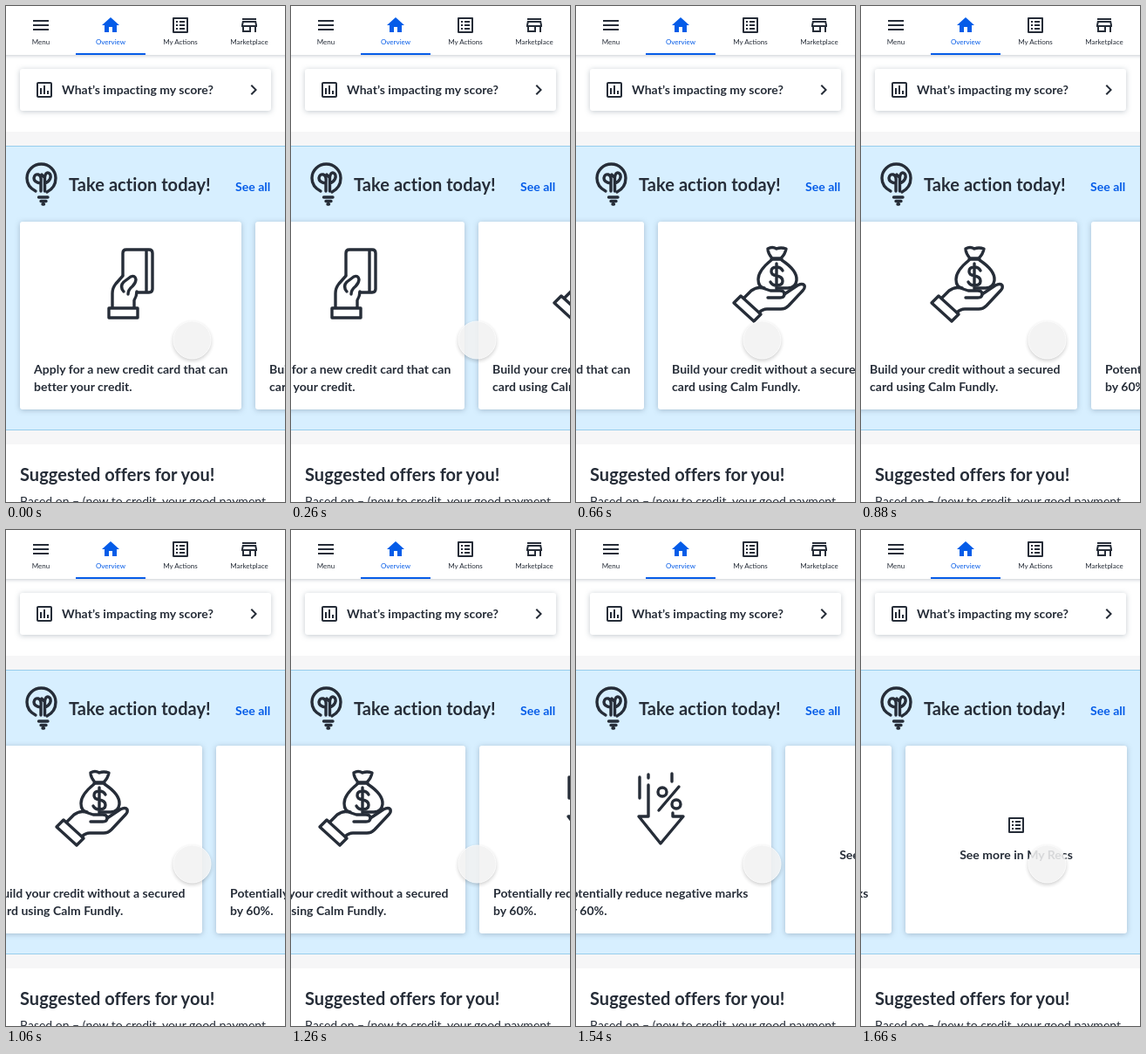
Recreate the animation shown at these times as an HTML page. Size 320 px wide and 568 px high, loop 3660 ms.

```html
<!DOCTYPE html>
<html lang="en">
<head>
<meta charset="utf-8">
<title>Credit overview</title>
<style>
  html, body { margin: 0; width: 100%; height: 100%; overflow: hidden; background: #fff; }
  svg { display: block; }
  text { font-family: Lato, sans-serif; fill: #262d38; }
  .h { font-size: 20px; font-weight: 700; letter-spacing: .05px; }
  .b { font-size: 14px; font-weight: 700; letter-spacing: .04px; }
  .p { font-size: 14px; }
  .nav { font-size: 8px; text-anchor: middle; }
  .mid { text-anchor: middle; }
  text.blue { fill: #055ce8; }
  .icon { fill: #262d38; }
  .icon.blue { fill: #055ce8; }
  .line { fill: none; stroke: #262d38; stroke-width: 3.4; stroke-linecap: round; stroke-linejoin: round; }
  .card { fill: #fff; filter: drop-shadow(0 1px 3px rgba(30, 50, 75, .27)); }
  .bar { fill: #fff; filter: drop-shadow(0 1px 2px rgba(30, 50, 75, .25)); }
  .touch { fill: #f2f2f2; stroke: #fafafa; filter: drop-shadow(0 2px 2px rgba(0, 0, 0, .22)); opacity: .87; }
</style>
</head>
<body>
<svg id="stage" width="320" height="568" viewBox="0 0 320 568"></svg>
<script>
const ICONS = {
  menu: 'M3 6h18v2H3zM3 11h18v2H3zM3 16h18v2H3z',
  home: 'M10 20v-6h4v6h5v-8h3L12 3 2 12h3v8z',
  list: 'M19 5v14H5V5h14m1.1-2H3.9c-.5 0-.9.4-.9.9v16.2c0 .4.4.9.9.9h16.2c.4 0 .9-.5.9-.9V3.9c0-.5-.5-.9-.9-.9z' +
    'M11 7h6v2h-6zM11 11h6v2h-6zM11 15h6v2h-6zM7 7h2v2H7zM7 11h2v2H7zM7 15h2v2H7z',
  store: 'M18.36 9l.6 3H5.04l.6-3h12.72M20 4H4v2h16V4zm0 3H4l-1 5v2h1v6h10v-6h4v6h2v-6h1v-2l-1-5zM6 18v-4h6v4H6z',
  chart: 'M19 3H5c-1.1 0-2 .9-2 2v14c0 1.1.9 2 2 2h14c1.1 0 2-.9 2-2V5c0-1.1-.9-2-2-2zm0 16H5V5h14v14z' +
    'M7 10h2v7H7zM11 7h2v10h-2zM15 13h2v4h-2z',
  chevron: 'M10 6L8.59 7.41 13.17 12l-4.58 4.59L10 18l6-6z'
};

const rect = (x, y, w, h, fill) => `<rect x="${x}" y="${y}" width="${w}" height="${h}" fill="${fill}"/>`;
const text = (x, y, cls, s) => `<text x="${x}" y="${y}" class="${cls}">${s}</text>`;
const icon = (name, x, y, cls = '') =>
  `<path class="icon ${cls}" fill-rule="evenodd" transform="translate(${x} ${y})" d="${ICONS[name]}"/>`;
const line = d => `<path class="line" d="${d}"/>`;
const ring = (x, y, r) => `<circle class="line" cx="${x}" cy="${y}" r="${r}"/>`;
const tab = (name, x, label, cls = '') => icon(name, x - 12, 10, cls) + text(x, 44, 'nav ' + cls, label);

// Card drawings use coordinates relative to the card's top left corner.
const handWithCard =
  line('M118 61V36q0-4 4-4h26q4 0 4 4v41q0 4-4 4h-14M145 32v49') +
  line('M102 99h33v11h-33z') +
  line('M106 98V82q0-6 4-11l8-9M131 98v-8q3-5 3-10') +
  line('M119 80q-5-6 0-11l8-6q5-2 6 3q0 4-4 8q-5 4-5 9');

const handWithBag =
  line('M131 42q-5-6-5-11q5-3 10 0q5-2 11 0q-1 6-6 11zM130 43h12') +
  line('M130 44q-15 12-15 22q0 9 7 10M142 44q18 12 17 23q-1 9-10 9h-12') +
  line('M143 56q-2-4-7-4q-6 0-6 5q0 4 6 5q7 1 7 6q0 5-7 5q-5 0-7-4M136 48v29') +
  line('M87 93l8-8l23 21l-8 8z') +
  line('M99 87l8-8q7-5 13-3l9 3h11q5 0 5 4t-5 4h-14') +
  line('M145 83l15-10q6-3 8 0q1 3-2 6l-16 17q-4 4-9 4h-16q-5 0-9 4');

const percentDown =
  line('M103 36v24M113 33v4M113 45v36h-11l25 31l26-31h-12v-4M140 32v9M148 47l-23 27') +
  ring(129, 53, 5) + ring(145, 67, 5);

const caption = (a, b) => text(16, 174, 'b', a) + text(16, 194, 'b', b);
const cards = [
  handWithCard + caption('Apply for a new credit card that can', 'better your credit.'),
  handWithBag + caption('Build your credit without a secured', 'card using Calm Fundly.'),
  percentDown + caption('Potentially reduce negative marks', 'by 60%.'),
  icon('list', 115, 79) + text(127, 130, 'b mid', 'See more in My Recs')
];

const bulb =
  line('M34 212q-10-5-10-15a16.5 16 0 0 1 33 0q0 11-10 16') +
  line('M40 212v-9q-8-1-8-6q1-5 5-4q4 1 3 10M44.5 212v-16q1-6 4-5q4 2 2 7q-2 4-6 5M41 193l3.5 4') +
  line('M37.5 219h10.5M40 223.5h6M42 227h1.5');

document.getElementById('stage').innerHTML =
  rect(0, 0, 320, 568, '#fff') +
  rect(0, 144, 320, 358, '#f6f6f7') +
  rect(0, 160, 320, 326, '#d7efff') +
  rect(0, 160, 320, 1, '#97cdec') + rect(0, 485, 320, 1, '#97cdec') +
  rect(0, 502, 320, 66, '#fff') +
  '<rect class="bar" x="-8" y="-8" width="336" height="64"/>' +
  tab('menu', 40, 'Menu') + tab('home', 120, 'Overview', 'blue') +
  tab('list', 200, 'My Actions') + tab('store', 279, 'Marketplace') +
  rect(80, 54, 80, 2, '#055ce8') +
  '<rect class="card" x="16" y="72" width="288" height="48" rx="3"/>' +
  icon('chart', 32, 84) + text(64, 101, 'b', 'What’s impacting my score?') + icon('chevron', 272, 84) +
  bulb + text(72, 212, 'h', 'Take action today!') + text(263, 212, 'b blue', 'See all') +
  '<g id="track">' + cards.map((body, i) =>
    `<g transform="translate(${16 + 270 * i} 247)"><rect class="card" width="254" height="215" rx="3"/>${body}</g>`
  ).join('') + '</g>' +
  '<circle class="touch" cx="213.5" cy="382.5" r="21.5"/>' +
  text(16, 544, 'h', 'Suggested offers for you!') +
  text(16, 572, 'p', 'Based on – (new to credit, your good payment');

const LOOP = 3660, END = 1660, STEP = 20;
// Scroll path: [time in ms, offset in px, speed in px per ms]
const path = [
  [0, 0, .25], [260, 71, .29], [660, 192, .37], [880, 292, .2],
  [1260, 340, .2], [1420, 405, .65], [1660, 775, .8]
];

function scrollAt(t) {
  if (t >= END) return path[path.length - 1][1];
  const i = path.findIndex(p => p[0] > t);
  const [t0, x0, v0] = path[i - 1], [t1, x1, v1] = path[i];
  const d = t1 - t0, u = (t - t0) / d, w = 1 - u;
  return w * w * ((1 + 2 * u) * x0 + u * d * v0) + u * u * ((3 - 2 * u) * x1 - w * d * v1);
}

const track = document.getElementById('track');
function draw(t) {
  const x = Math.round(scrollAt(Math.floor(t / STEP) * STEP));
  track.setAttribute('transform', `translate(${-x} 0)`);
}

const start = performance.now();
function tick() {
  draw((performance.now() - start) % LOOP);
  requestAnimationFrame(tick);
}
tick();
</script>
</body>
</html>
```
